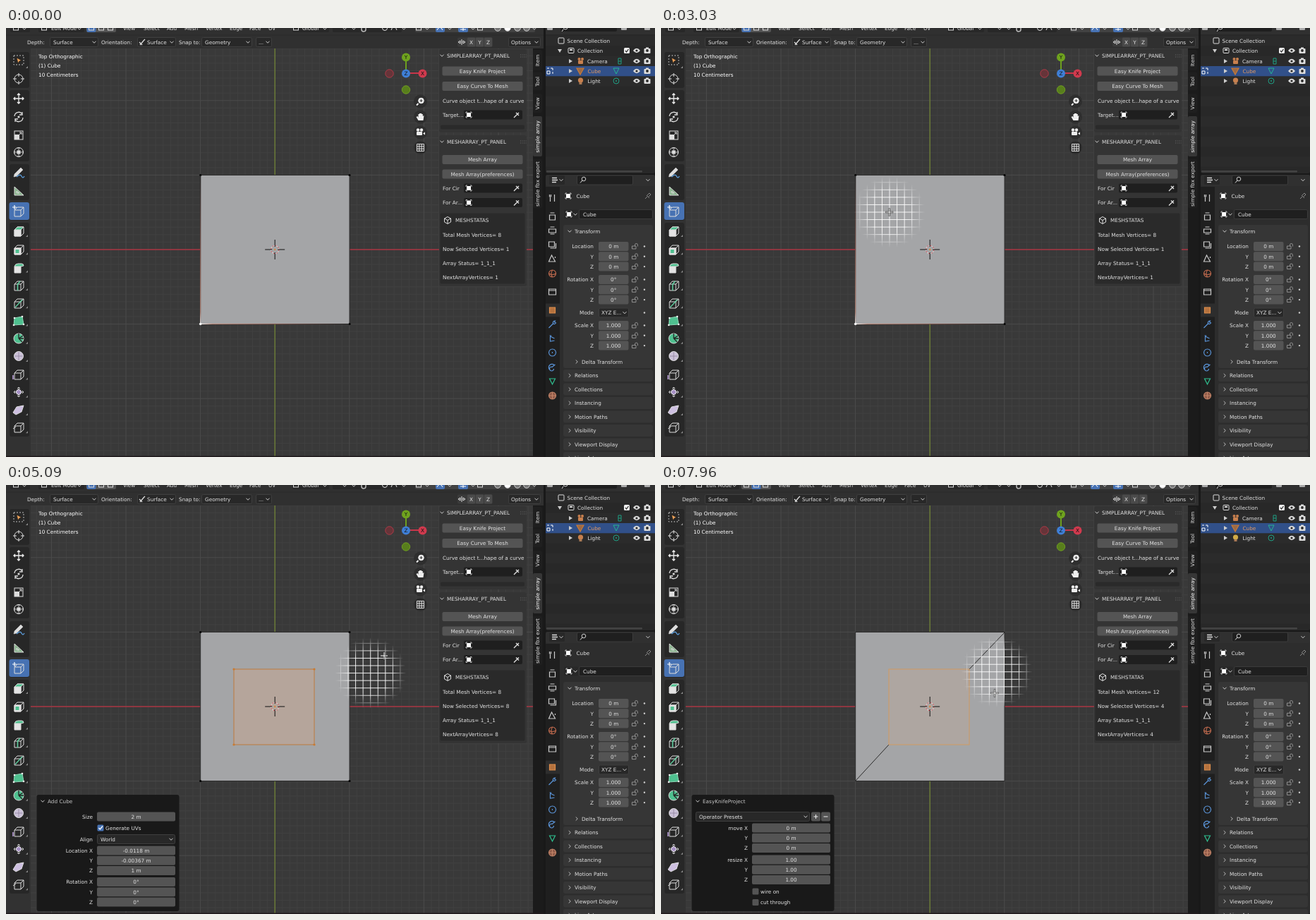
Write an HTML page that moves like this. It is 920 px wide and 608 px high and loops after 8 s.

```html
<!DOCTYPE html>
<html lang="en">
<head>
<meta charset="utf-8">
<title>Knife project demo</title>
<style>
html,body{margin:0;width:100%;height:100%;overflow:hidden;background:#393939}
svg{display:block;width:920px;height:608px}
text{font:7.3px "DejaVu Sans",sans-serif;fill:#e2e2e2;white-space:pre}
.m{text-anchor:middle}
.e{text-anchor:end}
.w{fill:#fff}
.o{fill:#e39a63}
</style>
</head>
<body>
<svg id="stage" viewBox="0 0 920 608"></svg>
<script>
const LOOP = 8000, PITCH = 10.56, CX = 381.2, CY = 314;
const range = (n, f) => Array.from({length: n}, (_, i) => f(i)).join('');

// drawing helpers; y of text and controls is the vertical centre
const rect = (x, y, w, h, fill, r = 0, more = '') =>
  `<rect x="${x}" y="${y}" width="${w}" height="${h}" rx="${r}" fill="${fill}" ${more}/>`;
const text = (x, y, s, cls = '', more = '') =>
  `<text x="${x}" y="${y + 2.7}" class="${cls}" ${more}>${s}</text>`;
const path = (x, y, d, stroke = '#ddd', fill = 'none', w = 1) =>
  `<path transform="translate(${x} ${y})" d="${d}" stroke="${stroke}" fill="${fill}" stroke-width="${w}"/>`;
const dot = (x, y, r, fill, stroke = 'none') =>
  `<circle cx="${x}" cy="${y}" r="${r}" fill="${fill}" stroke="${stroke}"/>`;
const group = (id, ...parts) => `<g id="${id}">${parts.join('')}</g>`;
const down = (x, y) => path(x, y, 'M-2.5-1.3L0 1.3 2.5-1.3', '#ccc');
const right = (x, y) => path(x, y, 'M-1.3-2.5L1.3 0-1.3 2.5', '#bbb');
const field = (x, y, w, s, id = '') =>
  rect(x, y - 6.5, w, 13, '#545454', 2, id && `id="${id}"`) + text(x + w / 2, y, s, 'm');
const menu = (x, y, w, s, pad = 5) =>
  rect(x + .5, y - 6.5, w - 1, 13, '#282828', 2, 'stroke="#3f3f3f"') + text(x + pad, y, s) + down(x + w - 6, y);
const check = (x, y, s, on) =>
  rect(x - 4.5, y - 4.5, 9, 9, on ? '#4772b3' : '#545454', 1.5) +
  (on ? path(x, y, 'M-2.5 0L-.7 2 3-2.5', '#fff', 'none', 1.3) : '') + text(x + 7, y, s);
const fields = (x, y, w, labels, values, edge) =>
  labels.map((s, i) => text(edge, y + i * 14.3, s, 'e') + field(x, y + i * 14.3, w, values)).join('');
const objIcon = (x, y) => path(x, y, 'M-4-2V-4H-2M2-4H4V-2M4 2V4H2M-2 4H-4V2', '#ddd', 'none', .8) + rect(x - 3, y - 3, 6, 6, '#fff', .5);
const eye = (x, y) => path(x, y, 'M-5 0Q0-6.5 5 0Q0 6.5-5 0Z', 'none', '#ddd') + dot(x, y, 1.6, '#2b2b2b');
const camera = (x, y) => rect(x - 4.5, y - 3, 9, 7, '#ddd', 1) + rect(x - 2, y - 4.5, 4, 2, '#ddd') + dot(x, y, 1.9, '#2b2b2b');
const handle = y => range(8, i => rect(729 + i % 4 * 2.5, y - 1.5 + (i >> 2) * 3, 1, 1, '#666'));

function viewport() {
  let minor = '', major = '';
  for (let i = -36; i <= 36; i++) {
    const x = CX + i * PITCH, y = CY + i * PITCH;
    const d = `M${x} 29V608M0 ${y}H747`;
    i % 10 ? minor += d : major += d;
  }
  return rect(0, 0, 763, 608, '#393939') +
    path(0, 0, minor, '#404040') + path(0, 0, major, '#4b4b4b') +
    path(0, 0, `M0 ${CY}H747`, '#a83341', 'none', 1.3) + path(0, 0, `M${CX} 29V608`, '#6f8236', 'none', 1.3) +
    ['Top Orthographic', '(1) Cube', '10 Centimeters'].map((s, i) => text(46, 40 + i * 13, s, 'w')).join('');
}

function mesh() {
  const corners = [[275.7, 208.5], [487, 208.5], [275.7, 419.5], [487, 419.5]];
  const inner = [[323, 261], [437, 261], [323, 368], [437, 368]];
  const pts = (list, c) => list.map(([x, y]) => dot(x, y, 1.6, c)).join('');
  return rect(275.7, 208.5, 211.3, 211, '#a4a5a7', 0, 'stroke="#262626" stroke-width=".9"') +
    group('verts', pts(corners, '#000')) +
    group('oldSel', path(275.7, 419.5, 'M0 0V-211', 'url(#edgeV)'), path(275.7, 419.5, 'M0 0H211', 'url(#edgeH)'), dot(275.7, 419.5, 1.8, '#fff')) +
    group('newCube', rect(323, 261, 114, 107, '#b5a59b', 0, 'stroke="#bd7a3c"'), pts(inner, '#c97a30')) +
    group('cut', path(0, 0, 'M487 209L437 261M276 419L323 368', '#2a2a2a'), rect(323, 261, 114, 107, '#aea6a1', 0, 'stroke="#d19a61"')) +
    rect(323, 261, 0, 0, 'none', 0, 'id="preview" stroke="#fff"') +
    `<g fill="none" stroke-width=".9"><circle cx="${CX}" cy="${CY}" r="5.7" stroke="#eee"/><circle cx="${CX}" cy="${CY}" r="5.7" stroke="#c8323c" stroke-dasharray="2.2 2.2"/></g>` +
    path(CX, CY, 'M-14 0H-4M4 0H14M0-14V-4M0 4V14', '#111') + dot(CX, CY, 1.2, '#d5863f');
}

function toolbar() {
  const box = 'M-6-2L-2-6H7V3L3 7H-6ZM-6-2H3V7M3-2L7-6';
  const cube = y => path(18, y, box, '#ddd');
  const tint = (y, d, c) => path(18, y, d, '#ddd', c);
  const top = 'M-6-2L-2-6H7L3-2Z', face = 'M-6-2H3V7H-6Z';
  const arrows = 'M-7 0H7M0-7V7M-5-2L-7 0-5 2M5-2L7 0 5 2M-2-5L0-7 2-5M-2 5L0 7 2 5';
  const icons = [
    rect(11, 39, 14, 13, 'none', 0, 'stroke="#bbb" stroke-dasharray="2 2"') + path(18, 46, 'M-3-4L4 0 1 1-1 4Z', '#111', '#eda35c', .6),
    dot(18, 72, 6, 'none', '#ddd') + path(18, 72, 'M-8 0H-3M3 0H8M0-8V-3M0 3V8', '#ddd'),
    path(18, 100, arrows, '#eee', 'none', 1.3),
    path(18, 126, 'M-6-1A6 6 0 0 1 5-4M6 1A6 6 0 0 1-5 4M5-7V-3H1M-5 7V3H-1', '#ddd', 'none', 1.3) + dot(18, 126, 1.6, '#ddd'),
    rect(12, 146, 12, 12, 'none', 0, 'stroke="#ddd"') + rect(12, 151, 7, 7, '#ddd') + path(18, 152, 'M0 0L4-4M1-4H4V-1'),
    dot(18, 176, 6.5, 'none', '#ddd') + rect(15.5, 173.5, 5, 5, '#ddd') + path(18, 176, arrows, '#ddd', 'none', .8),
    path(18, 205, 'M-6 2L3-7 6-4-3 5-7 6Z', '#ddd', '#ddd', .5) + path(18, 205, 'M-3 6Q2 1 4 5T8 5', '#5b9bd8', 'none', 1.4),
    path(18, 231, 'M-6-6V6H7ZM-3 0V3H1Z', '#ddd', '#86b28a'),
    cube(260) + path(12, 254, 'M-3 0H3M0-3V3', '#fff', 'none', 1.2),
    cube(288) + tint(288, face, '#e4e4e4') + tint(288, top, '#4fc08f'),
    cube(314) + tint(314, face, '#e4e4e4') + rect(13.5, 314, 5, 5, '#4fc08f'),
    tint(340, face, '#e4e4e4') + tint(340, 'M-6-2Q-5-6-1-6H4Q7-6 7-3L3-2Z', '#4fc08f'),
    cube(365) + path(18, 365, 'M-1.5 7V-2L2-6', '#5fd0a0', 'none', 1.6),
    cube(390) + path(18, 390, 'M-5 6L5-5', '#5fd0a0', 'none', 1.3),
    path(18, 415, 'M-6-4L5-6 7 5-7 6Z', '#8fd8b8', '#4fc08f') + [[-6, -4], [5, -6], [7, 5], [-7, 6]].map(([x, y]) => dot(18 + x, 415 + y, 1.3, '#eee')).join(''),
    dot(18, 440, 7, '#4fc08f', '#ddd') + path(18, 440, 'M0 0V-7M0 0L6-4M0 0H7M0 0L5 5', '#242424', 'none', 1.3),
    dot(18, 465, 6.5, '#cbc1d8', '#ddd') + path(18, 465, 'M-6 0H6M0-6V6', '#8d809c', 'none', .8),
    cube(491) + path(18, 491, 'M-8 7V1', '#c3a6e6', 'none', 1.5),
    path(18, 516, arrows, '#ccc') + dot(18, 516, 3.5, '#a58fc4', '#eee'),
    tint(541, 'M-8 4L-3-4 7-6 4 3-4 7Z', '#cdbfe0'),
    cube(566) + path(18, 566, 'M-8 2L-4-1', '#ddd')
  ];
  const groups = [[34, 51], [88, 101], [193, 51], [247, 26], [276, 303]];
  return rect(0, 29, 35, 579, '#323232') +
    groups.map(([y, h]) => rect(5, y, 28, h, '#272727', 3)).join('') +
    rect(4.5, 247, 28.5, 25, '#4772b3', 3) + icons.join('') +
    range(12, i => path(31, 296 + i * 25.3, 'M0-3V0H-3Z', 'none', '#888')) +
    path(31, 57, 'M0-3V0H-3Z', 'none', '#888');
}

function header() {
  const items = {166: 'View', 195: 'Select', 228: 'Add', 253: 'Mesh', 283: 'Vertex', 317: 'Edge', 345: 'Face', 372: 'UV', 420: 'Global'};
  const light = [697, 711, 725, 738];
  return rect(0, 0, 763, 29, '#303030') + rect(0, 9.5, 763, 1, '#2a2a2a') +
    rect(6, -4, 28, 10, '#282828', 2) + rect(46, -4, 65, 10, '#282828', 2) + rect(114, -4, 42, 10, '#545454', 2) +
    rect(406, -4, 52, 10, '#282828', 2) + rect(463, -4, 98, 10, '#282828', 2) + rect(580, -4, 170, 10, '#424242', 2) +
    rect(114.5, -4, 13, 10, '#4772b3', 2, 'id="mode"') + rect(609, -4, 13, 10, '#4772b3', 2) + rect(641, -4, 14, 10, '#4772b3', 2) +
    text(64, 0, 'Edit Mode') + Object.entries(items).map(([x, s]) => text(+x, 0, s)).join('') +
    [14, 54, 121, 135, 148, 411, 585, 672].map(x => rect(x - 3.5, -3, 7, 6, 'none', 0, 'stroke="#ddd"')).join('') +
    [26, 104, 452, 480, 493, 564, 597, 629, 662, 749].map(x => down(x, 1)).join('') +
    path(507, 0, 'M-3-3V2A3 3 0 0 0 3 2V-3', '#bbb', 'none', 1.5) + dot(537, 0, 3.5, 'none', '#ddd') + path(550, 0, 'M-4 3Q0-9 4 3') +
    path(615, 0, 'M-4 3Q0-5 4 3', '#fff') + path(648, 0, 'M-4 2H4M0-3V4', '#fff') +
    light.map((x, i) => dot(x, 0, 4.3, i == 1 ? '#fff' : '#777', '#ccc')).join('') +
    text(30, 20, 'Depth:') + menu(62, 20, 69, 'Surface') + text(135, 20, 'Orientation:') +
    menu(186, 20, 55, 'Surface', 14) + path(193, 20, 'M-3 4L2-2 4-4M-4 0L0 4', '#ddd', 'none', 1.3) +
    text(245, 20, 'Snap to:') + menu(277, 20, 72, 'Geometry') + menu(354, 20, 23, '...', 4) +
    rect(640, 13.5, 50, 13, '#3a3a3a', 2) + path(646, 20, 'M0-4V4M-2-2L-5 0-2 2ZM2-2L5 0 2 2Z') +
    ['X', 'Y', 'Z'].map((s, i) => rect(654 + i * 12, 13.5, 11, 13, '#4a4a4a', 1) + text(659.5 + i * 12, 20, s, 'm')).join('') +
    menu(712, 20, 46, 'Options', 4);
}

function gizmo() {
  const axis = (x, y, c, s) => dot(x, y, 6, c) + text(x, y, s, 'm', 'style="fill:#111"');
  const nav = [104, 126, 148, 169.5].map(y => dot(587.5, y, 9.5, '#2e2e2e')).join('');
  return path(567, 64, 'M0-23V0', '#6d9f1f', 'none', 2) + path(567, 64, 'M0 0H23', '#c9364a', 'none', 2) +
    dot(543.5, 64.5, 5.7, '#663439', '#b13a48') + dot(567, 87.5, 5.7, '#587e1c', '#719f22') +
    axis(567, 41.5, '#6fa31e', 'Y') + axis(590.5, 64.5, '#d13a4e', 'X') + axis(567, 64.5, '#3f7fd6', 'Z') + nav +
    dot(588.5, 103, 3.8, '#eee', '#eee') + path(588.5, 103, 'M-2 0H2M0-2V2M-3 3L-6 6', '#333') + path(584.5, 107, 'M0 0L-2.5 2.5', '#eee', 'none', 2) +
    path(587.5, 126, 'M-3 5L-6 0-4-1-3 1V-4H-1.5V-1-5H0V-1-5H1.7V-1-4H3.3V-1L5-2 4 5Z', 'none', '#eee') +
    rect(582, 147, 8, 5, '#eee', 1) + dot(584, 144.5, 2.2, '#eee') + dot(589, 144.5, 2.2, '#eee') + path(591, 149.5, 'M0 0L3-2V2Z', 'none', '#eee') +
    path(587.5, 169.5, 'M-5-5H5V5H-5ZM-5-1.7H5M-5 1.7H5M-1.7-5V5M1.7-5V5', '#eee', 'none', .9);
}

function sidebar() {
  const picker = (y, s) => text(619, y, s) + rect(649, y - 6.5, 83, 13, '#1f1f1f', 2) + objIcon(656, y) +
    path(724, y, 'M-4 4L1-1M-1-3L3 1M0 0L3-3', '#ddd', 'none', 1.4);
  const title = (y, s) => down(618, y) + text(625, y, s) + handle(y);
  const tabs = [[46, 30, 'Item'], [76, 27, 'Tool'], [107, 28, 'View'], [154, 58, 'simple array'], [221, 70, 'simple fbx export']];
  return rect(614, 30, 124, 118, '#343434', 3) + rect(614, 152, 124, 214, '#343434', 3) +
    title(39, 'SIMPLEARRAY_PT_PANEL') + field(618.5, 61, 114, 'Easy Knife Project', 'knife') + field(618.5, 82.5, 114, 'Easy Curve To Mesh') +
    text(619, 103, 'Curve object t...hape of a curve') + picker(123, 'Target...') + rect(616, 137.5, 119, 6, '#2a2a2a', 2) +
    title(161, 'MESHARRAY_PT_PANEL') + field(618.5, 186.5, 114, 'Mesh Array') + field(618.5, 207, 114, 'Mesh Array(preferences)') +
    picker(227, 'For Cir') + picker(247.5, 'For Ar...') + rect(615.5, 262.5, 120, 100, '#2a2a2a', 2) +
    path(626, 272.5, 'M0-5L4.5-2.5V2.5L0 5-4.5 2.5V-2.5ZM-4.5-2.5L0 0 4.5-2.5M0 0V5') + text(637, 272.5, 'MESHSTATAS') +
    text(619, 293, '', '', 'id="total"') + text(619, 313, '', '', 'id="picked"') + text(619, 333.5, 'Array Status= 1_1_1') + text(619, 353.5, '', '', 'id="next"') +
    rect(747, 29, 16, 579, '#1b1b1b') +
    tabs.map(([y, h, s], i) => rect(747, y - h / 2, 13, h - 1, i == 3 ? '#363636' : '#1f1f1f', 2) +
      `<text class="m ${i == 3 ? 'w' : ''}" transform="translate(756 ${y}) rotate(-90)">${s}</text>`).join('');
}

function outliner() {
  const tri = (x, y) => path(x, y, 'M-2-3L3 0-2 3Z', 'none', '#ccc');
  return rect(762, 0, 158, 608, '#191919') + rect(765, 0, 155, 206, '#282828', 3) +
    range(7, i => rect(765, 11 + i * 28.6, 155, 14.3, '#2b2b2b')) + rect(765, 0, 155, 9, '#303030') +
    rect(786, -5, 80, 10, '#1f1f1f', 2) + dot(793, -1, 3, 'none', '#ccc') + path(790, 2, 'M0 0L-2 3') + [771, 876, 909].map(x => rect(x - 4, -3, 8, 6, '#aaa', 1)).join('') +
    rect(765, 54, 155, 14.3, '#315089') +
    rect(783, 14, 8, 8, 'none', 1, 'stroke="#ddd"') + text(795.5, 18, 'Scene Collection') +
    path(785, 32, 'M-3-2H3L0 3Z', 'none', '#ccc') + rect(797, 28.5, 8, 7, 'none', 1, 'stroke="#ddd"') + rect(799, 30, 4, 2, '#ddd') + text(810, 32.5, 'Collection') +
    rect(876, 28, 8, 8, '#eee', 1.5) + path(880, 32, 'M-2 0L-.5 2 2.5-2', '#222', 'none', 1.2) +
    [32, 47, 61, 75].map(y => eye(894, y) + camera(909, y)).join('') + [47, 61, 75].map(y => tri(800, y)).join('') +
    rect(811, 46, 7, 5, '#c8804e', 1) + dot(812.5, 44, 2, '#c8804e') + dot(817, 44, 2, '#c8804e') + text(824, 47, 'Camera') + path(870, 47, 'M-2-4H2V4H-2ZM-2 0H2', '#1f9f84') +
    path(814, 61, 'M-5-4H5L0 5Z', '#c87a38', '#9c6a44', 1.2) + text(824.5, 61.5, 'Cube', 'o') + path(865, 61, 'M-4-4H4L0 4Z', '#25b493') +
    path(771, 61, 'M-4-4H-1M1-4H4V-1M4 1V4M-4 4V0H0V4Z', '#fff') +
    `<circle id="lamp" cx="814.5" cy="74" r="3.6"/>` + rect(812.5, 77, 4, 3, '#aa7a55') + text(824.5, 75.5, 'Light') + dot(865, 75, 4, 'none', '#1f9f84') + dot(865, 75, 1, '#1f9f84') +
    rect(766, 202, 136, 2.5, '#444', 1);
}

function properties() {
  const tabs = [[241, '#ccc'], [267, '#ccc'], [287, '#ccc'], [307, '#ccc'], [327, '#ccc'], [348, '#c06a4e'], [374, '#ccc'], [400, '#dd8d4c'],
    [420, '#5a93d6'], [440, '#5a93d6'], [460, '#5a93d6'], [481, '#5a93d6'], [501, '#2fbf8f'], [521, '#c28468']];
  const shapes = ['M-3 5V-1M3 5V-1M-4-5V-2H-2V-5M3-5V0', 'M-4-2H4V5H-4ZM-3-5H3', 'M-5-2H5V3H-5ZM-3-5H3M-3 5H3', 'M-5-4H3V3H-5ZM-3 5H5V-2', 'M-1-5L4 4H-5ZM4-3V-1',
    'M0-5A5 5 0 1 0 .1-5ZM-5 0Q0 3 5 0M0-5Q-3 0 0 5', 'M-5-4H5V4H-5ZM-5-2H5', 'M-4-4H4V4H-4Z', 'M-5 5L1-1M1-1A3 3 0 0 1 4-5L3-3 5-2A3 3 0 0 1 1-1',
    'M-4-4H-2V-2M-3-3L3 0M-3-3V4L3 3', 'M0-5A5 5 0 1 0 .1-5ZM0-1V1', 'M-4 3A4 4 0 1 1 3-3M-1 0L4-4M2 2A3 3 0 1 1-1-1', 'M-4-4H4L0 4Z', 'M0-5A5 5 0 1 0 .1-5ZM0-5V5M-5 0H5'];
  const lock = y => path(891, y, 'M-3.5-.5H2V3.5H-3.5ZM.5-.5V-2A2 2 0 0 1 4.5-2V0', '#999', 'none', .9) + dot(905, y, 1.2, '#ccc');
  const trio = (y, s, v) => fields(840, y, 42.5, [s, 'Y', 'Z'], v, 833) + range(3, i => lock(y + i * 14.3));
  const closed = ['Relations', 'Collections', 'Instancing', 'Motion Paths', 'Visibility', 'Viewport Display', 'Line Art'];
  return rect(765, 208, 155, 400, '#2d2d2d', 3) + rect(765, 208, 155, 16, '#303030', 3) + rect(765, 225, 20, 383, '#1f1f1f') +
    rect(765, 390.5, 20, 19, '#2d2d2d') +
    tabs.map(([y, c], i) => path(774.5, y, shapes[i], c, i == 7 ? '#b5723e' : i == 13 ? '#8f5a48' : 'none', 1.2)).join('') +
    rect(770, 209, 22, 13, '#282828', 2) + path(778, 215.5, 'M-4-3H3M-4 0H4M-4 3H2', '#ddd', 'none', 1.5) + down(787, 215.5) +
    rect(809.5, 209, 79, 13, '#1f1f1f', 2, 'stroke="#3b3b3b"') + dot(819, 214, 2.8, 'none', '#ccc') + path(817, 216, 'M0 0L-3 3.5') + down(910, 215.5) +
    objIcon(797, 238) + text(808.5, 238.5, 'Cube') + path(910, 238, 'M-4 4L-1 1M-2-1L2 3M-1-1L2-4 4-2 1 1', '#888') +
    rect(791, 257.5, 20, 13, '#282828', 2) + objIcon(798, 264) + down(807, 264) + rect(812.5, 257.5, 104, 13, '#1f1f1f', 2, 'stroke="#3b3b3b"') + text(818, 264, 'Cube') +
    rect(790, 279, 127, 203, '#363636', 3) + down(799, 288) + text(806, 288, 'Transform') +
    trio(309.5, 'Location', '0 m') + trio(356.5, 'Rotation X', '0°') + text(833, 403.5, 'Mode', 'e') + menu(840, 403.5, 43, 'XYZ E...', 4) + dot(905, 403.5, 1.2, '#ccc') +
    trio(421.5, 'Scale X', '1.000') + right(809, 473) + text(816, 473, 'Delta Transform') +
    closed.map((s, i) => { const y = 492.5 + i * 19.5; return rect(790, y - 8.5, 127, 17, '#363636', 3) + right(799, y) + text(806, y, s); }).join('');
}

function popups() {
  const back = s => rect(43.5, 439, 202, 165, '#191919', 3) + down(52, 448) + text(59, 448.5, s, '', 'opacity=".85"');
  const add = group('addFields', text(123, 470, 'Size', 'e'), field(129, 470, 111, '2 m'), check(134, 486, 'Generate UVs', true),
    text(123, 502, 'Align', 'e'), menu(129, 502, 111, 'World'),
    ['-0.0118 m', '-0.00367 m', '1 m'].map((v, i) => fields(129, 518 + i * 14.2, 111, [['Location X', 'Y', 'Z'][i]], v, 123)).join(''),
    fields(129, 562.5, 111, ['Rotation X', 'Y', 'Z'], '0°', 123));
  const knife = group('cutFields', menu(49, 470, 162, 'Operator Presets'), field(213, 470, 13, ''), field(227, 470, 13, ''),
    path(219.5, 470, 'M-3 0H3M0-3V3', '#eee'), path(233.5, 470, 'M-3 0H3', '#eee'),
    fields(129, 486, 111, ['move X', 'Y', 'Z'], '0 m', 123), fields(129, 531, 111, ['resize X', 'Y', 'Z'], '1.00', 123),
    check(134, 576, 'wire on'), check(134, 591.5, 'cut through'));
  return group('addPanel', back('Add Cube'), add) + group('cutPanel', back('EasyKnifeProject'), knife);
}

const gridLines = range(9, i => { const p = (i - 4) * PITCH; return `M${p}-50V50M-50 ${p}H50`; });
const fade = (id, to) => `<linearGradient id="${id}" gradientUnits="userSpaceOnUse" x1="0" y1="0" ${to}>
  <stop offset="0" stop-color="#fff"/><stop offset=".08" stop-color="#c08a7a"/><stop offset=".5" stop-color="#85574d"/><stop offset="1" stop-color="#262626"/></linearGradient>`;
const defs = `<defs>${fade('edgeV', 'x2="0" y2="-211"')}${fade('edgeH', 'x2="211" y2="0"')}
  <radialGradient id="glow"><stop offset=".58" stop-color="#fff"/><stop offset="1" stop-color="#fff" stop-opacity="0"/></radialGradient>
  <mask id="disc" maskUnits="userSpaceOnUse" x="-51" y="-51" width="102" height="102"><circle r="51" fill="url(#glow)"/></mask></defs>`;
const pointer = group('press', dot(0, 0, 9, '#e6d01c')) +
  group('cross', path(0, 0, 'M-5.5 0H5.5M0-5.5V5.5', '#333', 'none', 2.4), path(0, 0, 'M-5 0H5M0-5V5', '#fff')) +
  group('arrow', path(0, 0, 'M0 0V10L2.4 8 4 12 6 11 4.3 7.3H7.4Z', '#111', '#fff', .8));

const $ = id => document.getElementById(id);
$('stage').innerHTML = defs + viewport() + mesh() +
  group('grid', `<g mask="url(#disc)">${path(0, 0, gridLines, '#fff', 'none', .9)}</g>`) +
  toolbar() + header() + gizmo() + sidebar() + popups() + rect(0, 606.5, 763, 1.5, '#201a1c') +
  outliner() + properties() + group('pointer', pointer);

// pointer track: time, x, y
const track = [
  [300, 824, 592], [560, 620, 460], [800, 400, 345], [1000, 240, 290], [1090, 216, 277], [1150, 232, 273],
  [1240, 305, 250], [1330, 306, 250], [1600, 70, 265], [1750, 22, 267], [2210, 22, 267],
  [2330, 200, 280], [2450, 312, 283], [2490, 321, 283], [2560, 322, 283], [2700, 330, 276], [2950, 326, 268],
  [2990, 324, 261], [3130, 323, 261], [3300, 350, 290], [3600, 425, 350], [3810, 449, 372], [3930, 437, 368],
  [4890, 437, 368], [5090, 536, 242], [5290, 536, 242], [5500, 600, 130], [5720, 655, 57], [6029, 655, 57],
  [6030, 655, 60], [7570, 655, 60], [7700, 600, 130], [7850, 505, 215], [7920, 476, 264], [7960, 473, 295]
];
function at(t) {
  const i = track.findIndex(p => p[0] > t);
  if (i < 0) return track[track.length - 1].slice(1);
  if (!i) return track[0].slice(1);
  const [t0, x0, y0] = track[i - 1], [t1, x1, y1] = track[i];
  const k = (t - t0) / (t1 - t0);
  return [x0 + (x1 - x0) * k, y0 + (y1 - y0) * k];
}
const show = (id, on) => $(id).style.display = on ? '' : 'none';
const move = (id, x, y) => $(id).setAttribute('transform', `translate(${x} ${y})`);
const set = (id, o) => Object.entries(o).forEach(([k, v]) => $(id).setAttribute(k, v));

function draw(t) {
  const [x, y] = at(t), [gx, gy] = at(t - 40);
  const visible = t >= 300, added = t >= 4410, cut = t >= 6980, drag = t >= 3100 && !added;
  const overUi = x < 35 || x > 611 || y < 29;
  const pressed = t >= 6580 && t < 6700;

  show('pointer', visible);
  move('pointer', x, y);
  show('cross', !overUi);
  show('arrow', overUi);
  show('press', t >= 1950 && t < 2010 || t >= 3100 && t < 3850 || t >= 4350 && t < 4550 || pressed);
  show('grid', visible && !overUi && !drag);
  move('grid', gx, gy);

  show('preview', drag);
  set('preview', {width: Math.max(0, x - 323), height: Math.max(0, y - 261)});
  show('oldSel', !added);
  show('verts', !cut);
  show('newCube', added && !cut);
  show('cut', cut);
  show('addPanel', added && !cut);
  show('addFields', t >= 4550);
  show('cutPanel', cut);
  show('cutFields', t >= 7110);

  const hover = x > 618 && x < 733 && y > 54 && y < 68;
  set('knife', {fill: pressed ? '#4772b3' : hover ? '#676767' : '#545454'});
  set('mode', {x: cut ? 128.5 : 114.5});
  set('lamp', {fill: cut ? '#d0ab48' : '#c8804e'});
  const picked = cut ? 4 : added ? 8 : 1;
  $('total').textContent = `Total Mesh Vertices= ${cut ? 12 : 8}`;
  $('picked').textContent = `Now Selected Vertices= ${picked}`;
  $('next').textContent = `NextArrayVertices= ${picked}`;
}

const start = performance.now();
function frame() {
  draw((performance.now() - start) % LOOP);
  requestAnimationFrame(frame);
}
frame();
</script>
</body>
</html>
```
